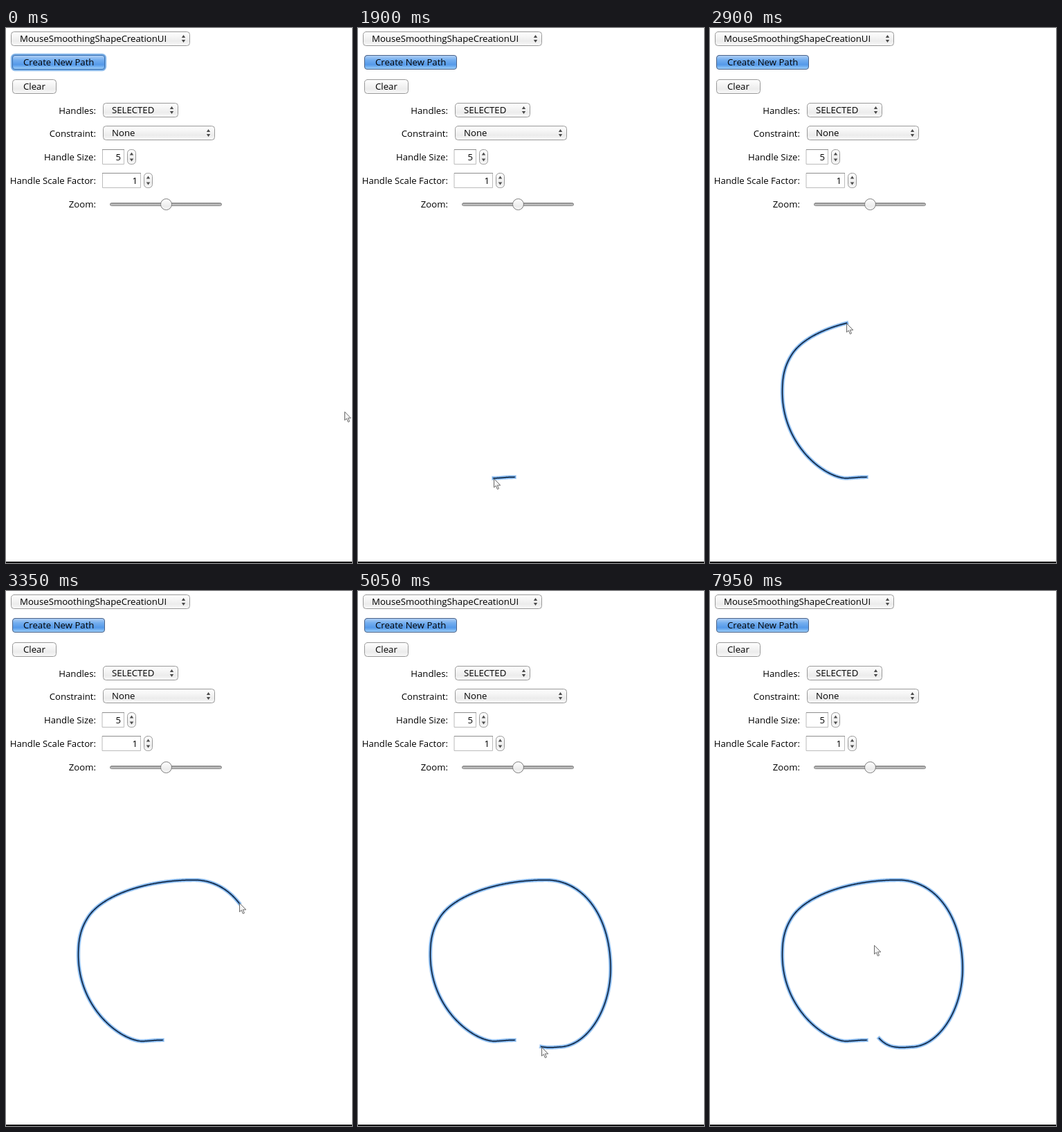
Animation, 500 px wide and 772 px high, one loop 8000 ms. Source, as an HTML page with a canvas:

```html
<!DOCTYPE html>
<html lang="en">
<head>
<meta charset="utf-8">
<title>Shape creation</title>
<style>
  html, body { margin: 0; width: 100%; height: 100%; overflow: hidden; background: #fff; }
  canvas { display: block; width: 500px; height: 772px; }
</style>
</head>
<body>
<canvas id="stage" width="500" height="772"></canvas>
<script>
const ctx = document.getElementById('stage').getContext('2d');
const LOOP = 8000, STEP = 50;
const PRESS = 1650, RELEASE = 5650;
const PAUSE = 4050, RESUME = 4300; // the line waits here while the pointer goes on

const PLAIN = ['#ffffff', '#f6f6f6', '#ececec', '#fbfbfb'];
const BLUE = ['#b9d5f6', '#74aeef', '#5499e9', '#a6d6fc'];

const shape = document.createElementNS('http://www.w3.org/2000/svg', 'path');
shape.setAttribute('d', `M226 648 C212 648 203 650 194 649.5
  C162 646 104.5 600 104.5 525 C104.5 505 107 488 119 470
  C139 440 200 417 272 417 C326 417 365 470 365 545
  C365 605 330 658 290 658 C268 660 256 658 244 645`);
const curve = [];
for (let s = 0, len = shape.getTotalLength(); s <= len; s++) curve.push(shape.getPointAtLength(s));

function nearest(x, y) {
  const gaps = curve.map(c => Math.hypot(c.x - x, c.y - y));
  return gaps.indexOf(Math.min(...gaps));
}

// Keys are [time, ...values]; a smooth spline that rests at both ends
const APPROACH = [[0, 489, 553], [850, 308, 612], [1150, 269, 640], [PRESS, 226, 648]];
const DRAWING = [
  [PRESS, 226, 648], [2450, 105, 526], [3350, 337, 451],
  [PAUSE, 349, 611], [4250, 340, 626], [5500, 244, 645]
].map(([t, x, y]) => [t, nearest(x, y)]);
const LEAVING = [
  [RELEASE, 244, 645], [5950, 242, 622], [6200, 242, 575], [6750, 242, 535], [7950, 237, 511]
];

function spline(keys, t) {
  const last = keys.length - 1;
  let i = 0;
  while (i < last - 1 && keys[i + 1][0] <= t) i++;
  const a = keys[i], b = keys[i + 1], span = b[0] - a[0];
  const u = Math.min(1, Math.max(0, (t - a[0]) / span));
  const slope = (n, k) => n === 0 || n === last ? 0
    : span * (keys[n + 1][k] - keys[n - 1][k]) / (keys[n + 1][0] - keys[n - 1][0]);
  return a.slice(1).map((v, j) => {
    const k = j + 1, ease = u * u * (3 - 2 * u);
    return v + (b[k] - v) * ease
      + slope(i, k) * u * (1 - u) ** 2 - slope(i + 1, k) * u * u * (1 - u);
  });
}

const lengthAt = t => Math.round(spline(DRAWING, t)[0]);

function pointerAt(t) {
  if (t < PRESS) return spline(APPROACH, t);
  if (t >= RELEASE) return spline(LEAVING, t);
  const { x, y } = curve[lengthAt(t)];
  return [x, y];
}

function gradient(y, h, colors) {
  const g = ctx.createLinearGradient(0, y, 0, y + h);
  colors.forEach((color, i) => g.addColorStop(i / (colors.length - 1), color));
  return g;
}

function paint(fill, border) {
  ctx.fillStyle = fill;
  ctx.fill();
  ctx.strokeStyle = border;
  ctx.lineWidth = 1;
  ctx.stroke();
}

function box(x, y, w, h, r, colors, border) {
  ctx.beginPath();
  ctx.roundRect(x + 0.5, y + 0.5, w - 1, h - 1, r);
  paint(gradient(y, h, colors), border);
}

function strokeLayers(layers) {
  for (const [width, color] of layers) {
    ctx.lineWidth = width;
    ctx.strokeStyle = color;
    ctx.stroke();
  }
}

function text(str, x, y, align = 'left') {
  ctx.font = '13.2px "Open Sans", "Noto Sans", sans-serif';
  ctx.textAlign = align;
  ctx.fillStyle = '#000';
  ctx.fillText(str, x, y);
}

const label = (str, y) => text(str, 130, y, 'right');

function arrows(x, y, gap) {
  ctx.fillStyle = '#4a4a4a';
  for (const dir of [-1, 1]) {
    const base = y + dir * gap;
    ctx.beginPath();
    ctx.moveTo(x - 2.7, base);
    ctx.lineTo(x + 2.7, base);
    ctx.lineTo(x, base + dir * 4);
    ctx.fill();
  }
}

function combo(str, x, y, w) {
  box(x, y, w, 21, 4, PLAIN, '#999');
  text(str, x + 13, y + 15);
  arrows(x + w - 9.5, y + 10.5, 1.6);
}

function spinner(value, y, w) {
  box(139, y, w, 22, 0, ['#fff', '#fff'], '#bcbcbc');
  ctx.fillStyle = '#8e8e8e';
  ctx.fillRect(139, y, w, 1);
  text(value, 134 + w, y + 16, 'right');
  box(143 + w, y, 13, 22, 5, PLAIN, '#999');
  arrows(149.5 + w, y + 11, 2.6);
}

function createButton(focused) {
  if (focused) {
    ctx.beginPath();
    ctx.roundRect(9, 39, 134, 21, 4);
    strokeLayers([[5, 'rgba(100, 165, 230, 0.4)'], [3, 'rgba(85, 150, 220, 0.75)']]);
  }
  box(9, 39, 134, 21, 3.5, BLUE, focused ? '#3d73b3' : '#4a6288');
  text('Create New Path', 25, 54);
}

function slider() {
  box(150, 252, 162, 5, 2.5, ['#8c8c8c', '#dedede'], '#858585');
  ctx.beginPath();
  ctx.arc(231.5, 254.5, 8, 0, 7);
  paint(gradient(246, 17, PLAIN), '#7c7c7c');
}

function panel(focused) {
  combo('MouseSmoothingShapeCreationUI', 7, 5, 259);
  createButton(focused);
  box(9, 74, 64, 21, 4, PLAIN, '#999');
  text('Clear', 25, 89);
  label('Handles:', 124);
  combo('SELECTED', 140, 108, 109);
  label('Constraint:', 157);
  combo('None', 140, 141, 162);
  label('Handle Size:', 191);
  spinner('5', 175, 32);
  label('Handle Scale Factor:', 225);
  spinner('1', 209, 56);
  label('Zoom:', 259);
  slider();
  ctx.fillStyle = '#000';
  ctx.fillRect(0, 770, 500, 2);
}

function line(t) {
  const end = lengthAt(t > PAUSE && t < RESUME ? PAUSE : t);
  if (end < 1) return;
  ctx.beginPath();
  for (const { x, y } of curve.slice(0, end + 1)) ctx.lineTo(x, y);
  ctx.lineJoin = 'round';
  ctx.lineCap = 'square';
  strokeLayers([
    [6.2, 'rgba(110, 170, 230, 0.35)'], [4.2, 'rgba(80, 150, 225, 0.75)'], [1.25, '#061020']
  ]);
}

function pointer([x, y]) {
  ctx.save();
  ctx.translate(Math.round(x), Math.round(y));
  ctx.lineJoin = 'round';
  ctx.beginPath();
  ctx.moveTo(0.5, 0.8);
  ctx.lineTo(0.5, 13);
  ctx.lineTo(3.3, 10.5);
  ctx.lineTo(5.4, 15.6);
  ctx.lineTo(7.5, 14.7);
  ctx.lineTo(5.4, 9.9);
  ctx.lineTo(9.3, 9.9);
  ctx.closePath();
  paint('#f4f4f4', '#6a6a6a');
  ctx.restore();
}

function draw(t) {
  ctx.fillStyle = '#fff';
  ctx.fillRect(0, 0, 500, 772);
  panel(t < PRESS);
  if (t >= PRESS) line(t);
  pointer(pointerAt(t));
}

const start = performance.now();
function tick() {
  const t = (performance.now() - start) % LOOP;
  draw(Math.floor(t / STEP) * STEP);
  requestAnimationFrame(tick);
}
tick();
</script>
</body>
</html>
```
